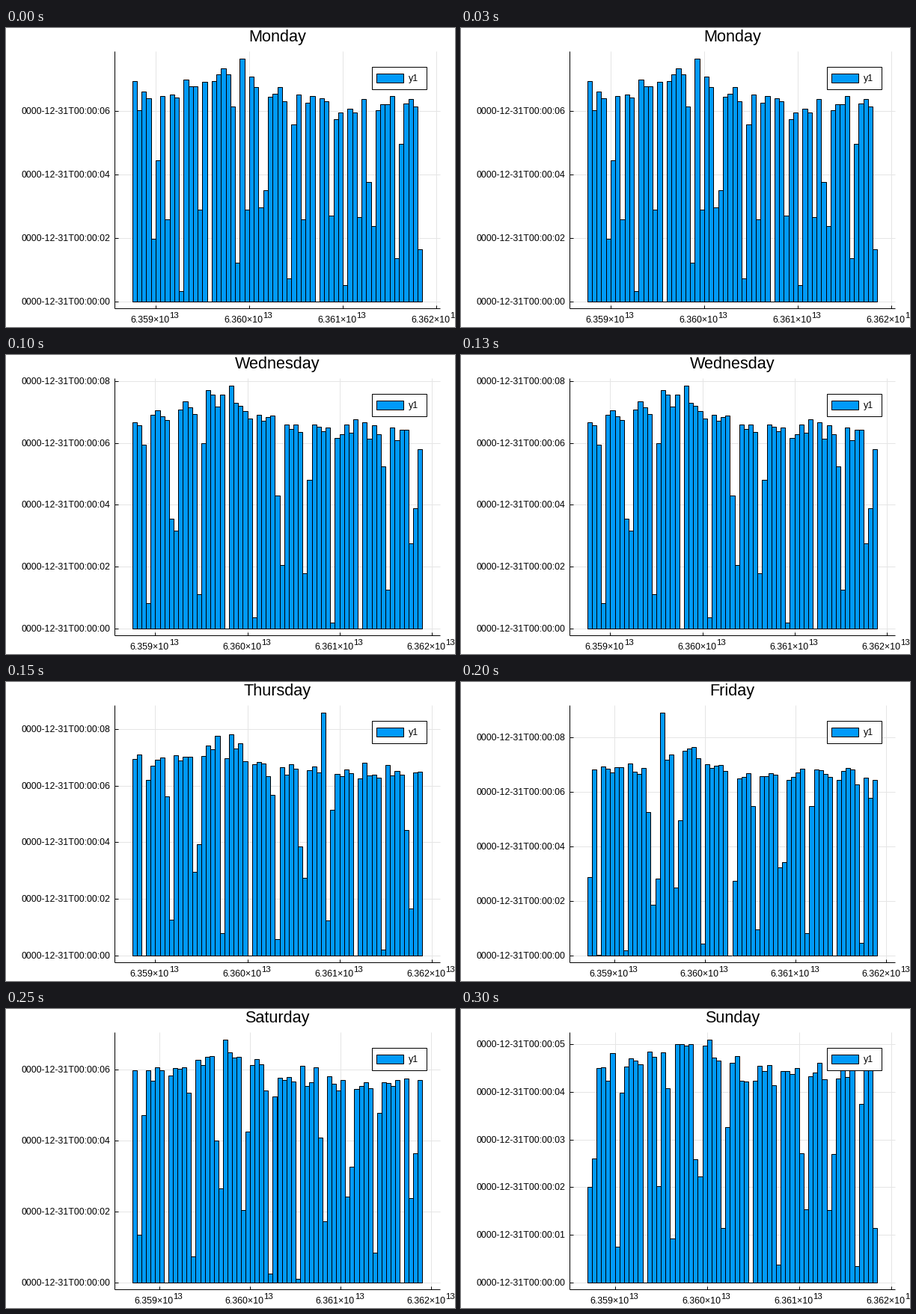
These frames come from a looping animation (600 px wide and 400 px high, 0.35 s). A matplotlib script:

```python
import numpy as np
import matplotlib.pyplot as plt
from matplotlib.animation import FuncAnimation
from matplotlib.patches import Rectangle

W, H, DPI = 600, 400, 100
PX = 72 / DPI
LEFT, RIGHT, TOP, BOTTOM = 145.5, 580.5, 31.5, 375.5
BAR_LEFT, BAR_RIGHT, BASE, PEAK = 169.2, 556.8, 366.3, 41.3
BLUE = "#009afa"
FONT = "Liberation Sans"

# Time in ms since year 0; the first day of the year is a Friday.
DAY = 86_400_000
BIN = 500_000_000
NEW_YEAR = 63_587_289_600_000

# Name, first day of the year, usual total, busiest week and its total.
WEEK = [("Monday", 3, 6.35, 19, 7.65),
        ("Tuesday", 4, 6.7, 43, 8.45),
        ("Wednesday", 5, 6.65, 17, 7.86),
        ("Thursday", 6, 6.55, 34, 8.59),
        ("Friday", 0, 6.65, 13, 8.92),
        ("Saturday", 1, 5.75, 16, 6.84),
        ("Sunday", 2, 4.45, 21, 5.1)]
HOLIDAYS = [0, 45, 84, 86, 87, 143, 182, 213, 248, 283, 351]


def daily_totals(days, level, busiest, peak):
    """A spring rise, quiet holidays and a midwinter dip, with some noise."""
    noise = np.random.default_rng(days[0]).normal(1, .03, len(days))
    season = 1.03 - .06 * days / 365 + .13 * np.exp(-((days - 115) / 40) ** 2)
    lull = 1 - .8 * np.exp(-((days - 359.5) / 1.6) ** 2)
    closed = np.where(np.isin(days, HOLIDAYS), .42, 1)
    totals = np.minimum(level * season * lull * closed * noise, .98 * peak)
    totals[busiest] = peak
    return totals


def bin_days(offset, level, busiest, peak):
    """Sum the days into bins; a day across an edge is shared by two bins."""
    days = np.arange(offset, 366, 7)
    swing = 0 if offset in (1, 2) else .085
    starts = NEW_YEAR + days * DAY
    first = starts[0] // BIN
    bars = np.zeros((starts[-1] + DAY - 1) // BIN - first + 1)
    for start, total in zip(starts, daily_totals(days, level, busiest, peak)):
        i = start // BIN - first
        part = min(1, ((start // BIN + 1) * BIN - start) / DAY)
        share = part - swing * np.sin(2 * np.pi * part)
        bars[i] += total * share
        if part < 1:
            bars[i + 1] += total * (1 - share)
    return first, bars


fig = plt.figure(figsize=(W / DPI, H / DPI), dpi=DPI, facecolor="white")
ax = fig.add_axes([0, 0, 1, 1])


def line(xs, ys, color="black", z=4):
    ax.plot(xs, ys, color=color, lw=PX, zorder=z, solid_capstyle="butt")


def box(x, y, w, h, fill, z=3):
    ax.add_patch(Rectangle((x, y), w, h, facecolor=fill, edgecolor="black",
                           lw=PX, zorder=z))


def label(x, y, text, size=12.4, ha="left"):
    ax.text(x, y, text, fontsize=size * PX, family=FONT, ha=ha,
            va="baseline", zorder=7)


def x_tick(x, value):
    line([x, x], [TOP, BOTTOM], "#e5e5e5", 1)
    line([x, x], [BOTTOM, BOTTOM - 4.5])
    label(x + 18.5, 395, f"{value / 1000:.3f}×10", ha="right")
    label(x + 18.5, 388, "13", 11.5)


def y_tick(y, value):
    line([LEFT, RIGHT], [y, y], "#e5e5e5", 1)
    line([LEFT, LEFT + 4.5], [y, y])
    label(140, y + 4, f"0000-12-31T00:00:{value:02d}", ha="right")


def legend():
    box(489.5, 52.5, 73, 30, "white", 5)
    box(495.5, 61.5, 36, 12, BLUE, 6)
    label(538, 72, "y1")


def draw(frame):
    ax.clear()
    # Half a pixel of offset puts the lines on pixel centres.
    ax.set(xlim=(.5, W + .5), ylim=(H + .5, .5))
    ax.axis("off")
    name, *rule = WEEK[frame]
    first, bars = bin_days(*rule)
    step = (BAR_RIGHT - BAR_LEFT) / len(bars)
    unit = (BASE - PEAK) / bars.max()

    for value in range(6359, 6363):
        x_tick(BAR_LEFT + (value * 10**10 / BIN - first) * step, value)
    top = (BASE - TOP) / unit
    for value in range(0, int(top) + 1, 2 if top > 6 else 1):
        y_tick(BASE - value * unit, value)

    for i, height in enumerate(bars):
        box(BAR_LEFT + i * step, BASE, step, -height * unit, BLUE)
    line([LEFT, LEFT], [TOP, BOTTOM])
    line([LEFT, RIGHT], [BOTTOM, BOTTOM])
    legend()
    label((LEFT + RIGHT) / 2, 18.5, name, 21.6, "center")
    return []


anim = FuncAnimation(fig, draw, frames=len(WEEK), init_func=lambda: [],
                     interval=50, repeat=True, repeat_delay=0)
plt.show()
```
